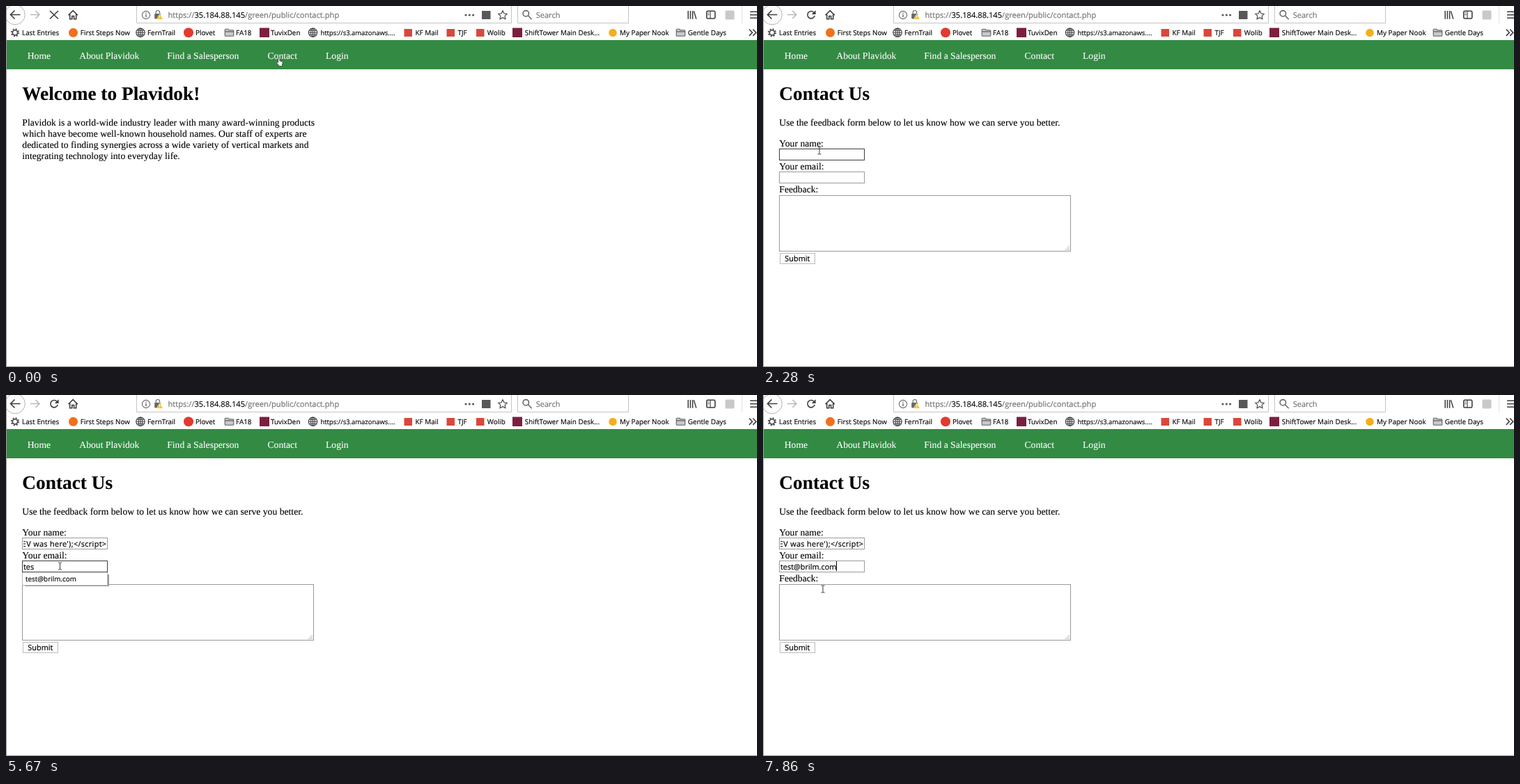
Animation of 1078 by 519 pixels, one loop 7.99 s. Source, as an HTML page:

```html
<!DOCTYPE html>
<html lang="en">
<head>
<meta charset="utf-8">
<title>Contact form</title>
<style>
html, body { margin: 0; width: 100%; height: 100%; overflow: hidden; background: #fff; }
svg { display: block; width: 1078px; height: 519px; }
text { text-rendering: geometricPrecision; white-space: pre; fill: currentColor; stroke: currentColor; stroke-width: .18; }
.ui { font-family: "Open Sans", "Noto Sans", sans-serif; font-size: 9.9px; color: #0c0c0d; }
.bar { font-size: 11.15px; color: #737373; }
.field { font-size: 10.9px; color: #000; }
.page { font-family: "Liberation Serif", serif; font-size: 13.66px; color: #000; stroke-width: .1; }
.nav { color: #fff; }
.h1 { font-size: 27.33px; font-weight: bold; }
.line { fill: none; stroke: #3d3d3f; stroke-width: 1.6; }
.thin { stroke-width: 1.1; }
.box { fill: #fff; stroke: #9a9a9a; }
</style>
</head>
<body>
<svg id="stage" viewBox="0 0 1078 519" xmlns="http://www.w3.org/2000/svg">
  <defs>
    <g id="globe" class="line thin">
      <circle r="6.2"/><ellipse rx="2.8" ry="6.2"/>
      <path d="M-6.2 0H6.2M-5.4-3H5.4M-5.4 3H5.4M0-6.2V6.2"/>
    </g>
    <path id="folder" d="M-6.3-3.8Q-6.3-5-5.2-5H-1.6L-.3-3.5H5.3Q6.3-3.5 6.3-2.5V4Q6.3 5 5.3 5H-5.3Q-6.3 5-6.3 4ZM-6-1.4H6" fill="#c9c9ca" stroke="#606062" stroke-width="1.1"/>
    <clipPath id="inField"><rect x="25" y="205" width="120" height="17"/></clipPath>
  </defs>

  <rect width="1078" height="519" fill="#fff"/>

  <!-- toolbar -->
  <circle cx="13" cy="12.5" r="14.3" fill="#fcfcfc" stroke="#b5b5b7"/>
  <path class="line" d="M20.5 12.5H7M12.5 6.5L6.5 12.5L12.5 18.5" stroke-width="1.9"/>
  <path class="line" d="M35 12.5H47.5M42.3 7L47.8 12.5L42.3 18" style="stroke:#b9b9ba"/>
  <path id="stop" class="line" d="M63 7L75 18.5M75 7L63 18.5"/>
  <circle id="dot" cx="63.5" cy="14" r=".8" fill="#d4d4d4"/>
  <g id="reload">
    <path class="line" d="M73 9.2A5.2 5.2 0 1 0 74.2 13.8"/>
    <path d="M75.6 6.2V12H69.8Z" fill="#3d3d3f"/>
  </g>
  <path class="line" d="M89.5 13.2L96.2 6.6L102.9 13.2M91.7 12V18.7H94.8V14.5H97.6V18.7H100.7V12"/>

  <path class="line" d="M187.5 -1V24.5H725.5V-1" style="stroke:#c4c4c6;stroke-width:1"/>
  <g class="line thin" style="stroke:#68686a">
    <circle cx="201" cy="13" r="5.6"/><path d="M201 12V16.2M201 9.6V10.9" stroke-width="1.4"/>
    <path d="M215.2 11V9.2A2.7 2.7 0 0 1 220.6 9.2V11"/>
  </g>
  <rect x="213.2" y="11" width="9" height="7.6" rx="1" fill="#68686a"/>
  <path d="M220.7 11.4L225.3 19.3H216.1Z" fill="#f5bd1d" stroke="#fff" stroke-width=".6"/>
  <path d="M220.7 14V16.5M220.7 17.3V18.3" stroke="#fff" stroke-width="1"/>
  <text class="ui bar" x="232.5" y="17">https://<tspan fill="#0c0c0d" stroke="#0c0c0d">35.184.88.145</tspan>/green/public/contact.php</text>
  <g fill="#58585a">
    <circle cx="660" cy="13" r="1.6"/><circle cx="665.3" cy="13" r="1.6"/><circle cx="670.6" cy="13" r="1.6"/>
    <rect x="683" y="7" width="12.5" height="12"/>
  </g>
  <path class="line" style="stroke:#58585a;stroke-width:1.3;stroke-linejoin:round" d="M713 6.6L714.9 10.8L719.4 11.3L716.1 14.4L717 18.9L713 16.6L709 18.9L709.9 14.4L706.6 11.3L711.1 10.8Z"/>

  <path class="line" d="M734.5 -1V24.5H893.5V-1" style="stroke:#c4c4c6;stroke-width:1"/>
  <g class="line" style="stroke:#68686a"><circle cx="746.3" cy="10.8" r="4.2"/><path d="M749.5 14L754.7 19.2"/></g>
  <text class="ui bar" x="760.8" y="17" style="font-size:11px">Search</text>

  <path class="line" d="M979.2 7V18.8M982.4 7V18.8M985.6 7V18.8M987.4 7.4L990.8 18.6" style="stroke-width:1.5"/>
  <rect class="line" x="1005.8" y="7.3" width="12" height="10.7" rx="1.6"/>
  <path class="line thin" d="M1011 7V18M1007.5 10H1009.5M1007.5 12.5H1009.5"/>
  <rect x="1032.5" y="6.5" width="13" height="13" rx="1.5" fill="#c9c9ca"/>
  <path d="M1056.5 0V25" stroke="#e2e2e3"/>
  <path class="line" d="M1068 8.2H1078M1068 12.7H1078M1068 17.2H1078"/>

  <!-- bookmarks -->
  <circle class="line" cx="13" cy="38.3" r="3.6"/>
  <circle class="line" cx="13" cy="38.3" r="5.3" stroke-dasharray="2.1 2.06"/>
  <circle cx="96.5" cy="38.3" r="6.5" fill="#f0701c"/>
  <use href="#globe" x="193" y="38.3"/>
  <circle cx="262" cy="38.3" r="7" fill="#e23a2e"/>
  <use href="#folder" x="320.5" y="38.3"/>
  <use href="#globe" x="440.5" y="38.3"/>
  <g fill="#7c1f3d"><rect x="364" y="31.5" width="14" height="13.5"/><rect x="727" y="31.5" width="14" height="13.5"/></g>
  <g fill="#d9483b"><rect x="571.5" y="33" width="11.5" height="11"/><rect x="632.5" y="33" width="11.5" height="11"/><rect x="675" y="33" width="11.5" height="11"/></g>
  <circle cx="871" cy="38.5" r="5.8" fill="#f2b01e"/>
  <use href="#folder" x="968.5" y="38.3"/>
  <g id="marks"></g>
  <path class="line" d="M1066.8 33.5L1071.3 38.2L1066.8 42.9M1072.2 33.5L1076.7 38.2L1072.2 42.9"/>

  <!-- page -->
  <rect y="49" width="1078" height="42" fill="#338a43"/>
  <g id="nav"></g>
  <g id="welcome"></g>
  <g id="contact">
    <g id="labels"></g>
    <rect id="nameBox" class="box" x="23.5" y="205.5" width="122" height="16"/>
    <g clip-path="url(#inField)">
      <text id="nameText" class="ui field" x="144.4" y="217.6" text-anchor="end" letter-spacing=".33">&lt;script&gt;alert('EV was here');&lt;/script&gt;</text>
    </g>
    <rect id="mailBox" class="box" x="23.5" y="238.5" width="122" height="16"/>
    <text id="mailText" class="ui field" x="25" y="250.6"></text>
    <rect class="box" x="23.5" y="272.5" width="418" height="80"/>
    <g fill="#8a8a8a" id="grip"></g>
    <rect x="24.5" y="355.5" width="50" height="15" fill="#fdfdfd" stroke="#bdbdbd"/>
    <text class="ui field" x="31.3" y="367">Submit</text>
    <g id="popup">
      <rect x="27" y="258" width="121" height="17" fill="#999"/>
      <rect x="23" y="255" width="123" height="19" fill="#b8b8b8"/>
      <rect id="popupBox" x="24" y="255" width="121" height="18"/>
      <text id="popupText" class="ui" x="28" y="268.3">test@brilm.com</text>
    </g>
    <rect id="caret" width="1" height="14" fill="#000"/>
  </g>
  <path d="M.5 0V519M0 518.5H1078" stroke="#9b9b9b"/>

  <!-- pointers -->
  <path id="hand" d="M390.7 74.8Q392 73.6 392.9 75.2V78.8L396.3 79.7Q397.4 80.1 397.3 81.6L396.3 85V86.6H391.3V85.2L388.5 81.8Q388.2 80.3 389.5 80.4L390.7 81.5Z" fill="#fff" stroke="#23412a" stroke-width=".8"/>
  <path id="beam" d="M-2.5-5H-.6L0-4.5L.6-5H2.5M0-4.5V4.5M-2.5 5H-.6L0 4.5L.6 5H2.5" fill="none" stroke="#3a3a3a" stroke-width="1"/>
</svg>
<script>
const LOOP = 7990;
const $ = id => document.getElementById(id);
const esc = s => s.replace(/&/g, '&amp;').replace(/</g, '&lt;');
const texts = (id, cls, rows) => {
  $(id).innerHTML = rows.map(([x, y, s, extra = '', size]) =>
    `<text class="${cls} ${extra}" x="${x}" y="${y}"${size ? ` style="font-size:${size}px"` : ''}>${esc(s)}</text>`).join('');
};

texts('marks', 'ui', [
  [23, 'Last Entries'], [106.8, 'First Steps Now'], [203, 'FernTrail'], [272, 'Plovet'],
  [330, 'FA18'], [380, 'TuvixDen'], [451.5, 'https://s3.amazonaws....', 9.45], [587.5, 'KF Mail'],
  [648.5, 'TJF'], [690.8, 'Wolib'], [744.8, 'ShiftTower Main Desk...'],
  [881, 'My Paper Nook'], [978.8, 'Gentle Days']
].map(([x, s, size]) => [x, 42, s, '', size]));

texts('nav', 'page nav', [
  [30.7, 'Home'], [105.3, 'About Plavidok'], [231.2, 'Find a Salesperson'], [375.5, 'Contact'], [459, 'Login']
].map(([x, s]) => [x, 76, s]));

texts('welcome', 'page', [
  [23.3, 135, 'Welcome to Plavidok!', 'h1'],
  ...['Plavidok is a world-wide industry leader with many award-winning products',
    'which have become well-known household names. Our staff of experts are',
    'dedicated to finding synergies across a wide variety of vertical markets and',
    'integrating technology into everyday life.'].map((s, i) => [23.3, 172 + 16 * i, s])
]);

texts('labels', 'page', [
  [23.3, 135, 'Contact Us', 'h1'],
  [23.3, 172, 'Use the feedback form below to let us know how we can serve you better.'],
  [23.3, 201.7, 'Your name:'], [23.3, 234.5, 'Your email:'], [23.3, 267.5, 'Feedback:']
]);

let dots = '';
for (let r = 0; r < 3; r++)
  for (let c = 0; c <= r; c++)
    dots += `<rect x="${438.5 - 2.2 * c}" y="${345.3 + 2.2 * r}" width="1.1" height="1.1"/>`;
$('grip').innerHTML = dots;

// Each track lists [start time, value]; the value holds until the next start.
const beamTrack = [[0, null], [1490, [126, 150]], [1850, [84, 210]], [2160, [81, 206]], [2280, [81, 208]],
  [3650, [81, 215]], [3770, [81, 223]], [3890, [81.5, 229]], [4040, [79, 240]],
  [4160, [77.5, 246]], [7740, [82, 265]], [7860, [86, 279]]];
const mailTrack = [[0, ''], [5120, 't'], [5260, 'te'], [5510, 'tes'], [6220, 'test'], [7040, 'test@brilm.com']];
const caretTrack = [[0, 0], [2160, 1], [2280, 0], [2680, 1], [3220, 0], [4040, 1], [4160, 0],
  [4530, 1], [4710, 0], [5120, 1], [5670, 0], [6070, 1], [6640, 0], [7040, 1], [7190, 0], [7590, 1]];

const at = (track, t) => track.reduce((v, [start, val]) => t >= start ? val : v, track[0][1]);
const show = (id, on) => $(id).setAttribute('visibility', on ? 'visible' : 'hidden');
const fade = (id, o) => $(id).setAttribute('opacity', o);
const within = (t, a, b) => t >= a && t < b;

function draw(t) {
  const loaded = t >= 1360;
  $('welcome').style.display = loaded ? 'none' : '';
  $('contact').style.display = loaded ? '' : 'none';
  show('stop', !loaded);
  show('dot', within(t, 1360, 1490));
  fade('reload', t < 1490 ? 0 : t < 1850 ? 0.4 : 1);

  show('hand', t < 1490);
  const beam = at(beamTrack, t);
  show('beam', beam);
  if (beam) $('beam').setAttribute('transform', `translate(${beam})`);

  $('nameBox').style.stroke = within(t, 2160, 4040) ? '#3c3c3c' : '';
  $('mailBox').style.stroke = within(t, 4040, 7740) ? '#3c3c3c' : '';
  show('nameText', t >= 3370);

  const mail = $('mailText');
  const typed = at(mailTrack, t);
  if (mail.textContent !== typed) mail.textContent = typed;

  const picked = t >= 6490;
  show('popup', within(t, 5260, 7040));
  $('popupBox').setAttribute('fill', picked ? '#0078d7' : '#fff');
  $('popupText').style.color = picked ? '#fff' : '';

  const inMail = t >= 4040;
  const caretX = 25 + (typed ? mail.getComputedTextLength() : 0);
  $('caret').setAttribute('x', Math.floor(caretX));
  $('caret').setAttribute('y', inMail ? 239 : 206);
  show('caret', at(caretTrack, t));
}

const begin = performance.now();
function tick() {
  draw((performance.now() - begin) % LOOP);
  requestAnimationFrame(tick);
}
tick();
</script>
</body>
</html>
```
